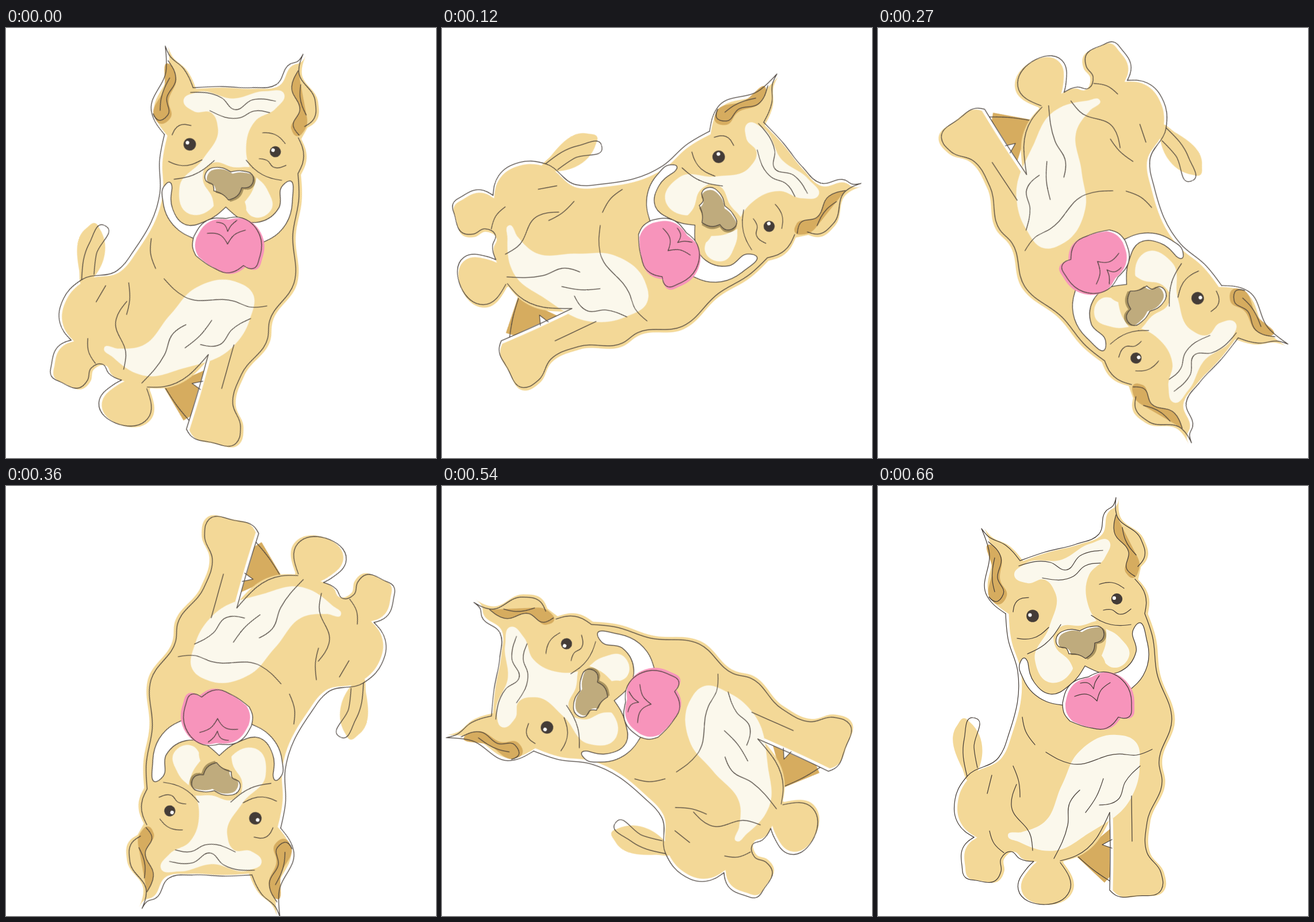
Write an HTML page that moves like this. It is 748 px wide and 748 px high and loops after 690 ms.

```html
<!DOCTYPE html>
<html lang="en">
<head>
<meta charset="utf-8">
<title>Spinning dog</title>
<style>
html, body { margin: 0; width: 100%; height: 100%; overflow: hidden; background: #fff; }
svg { display: block; width: 100vw; height: 100vh; }
#dog { transform-origin: 376.7px 390.2px; }
</style>
</head>
<body>
<svg viewBox="0 0 748 748"><g id="dog"></g></svg>
<script>
const INK = '#463e38', TAN = '#f3d897', CREAM = '#fbf8ec', BROWN = '#d6ac5f', PINK = '#f794bb';
const dog = document.getElementById('dog');

function add(tag, attrs, parent = dog) {
  const el = document.createElementNS('http://www.w3.org/2000/svg', tag);
  for (const key in attrs) el.setAttribute(key, attrs[key]);
  return parent.appendChild(el);
}

const sub = (a, b) => [a[0] - b[0], a[1] - b[1]];
const move = (a, v, k) => [a[0] + v[0] * k, a[1] + v[1] * k];
const unit = v => move([0, 0], v, 1 / (Math.hypot(...v) || 1));

// Direction of the circle through three neighbours, taken at the middle one.
function tangent(a, b, c) {
  const u = sub(b, a), v = sub(c, b);
  return unit(move(move([0, 0], unit(u), Math.hypot(...v)), unit(v), Math.hypot(...u)));
}

// Smooth curve through key points "x,y"; "/" makes a corner.
function curve(text, start = 'M') {
  let d = '', last;
  for (const run of text.split('/')) {
    const p = run.trim().split(/\s+/).map(s => s.split(',').map(Number));
    if (last) p.unshift(last);
    else d = start + p[0];
    const n = p.length - 1, loop = n > 2 && '' + p[0] === '' + p[n];
    for (let i = 0; i < n; i++) {
      const a = p[i], b = p[i + 1], reach = 0.37 * Math.hypot(...sub(b, a));
      const before = p[i - 1] || (loop && p[n - 1]), after = p[i + 2] || (loop && p[1]);
      let c1 = before && move(a, tangent(before, a, b), reach);
      const c2 = after ? move(b, tangent(a, b, after), -reach) : move(b, unit(sub(b, c1 || a)), -reach);
      c1 = c1 || move(a, unit(sub(c2, a)), reach);
      d += `C${[c1, c2, b].map(q => q.map(v => v.toFixed(1))).join(' ')}`;
    }
    last = p[n];
  }
  return d;
}

const fill = (d, color, dx = 0, dy = 0, parent = dog) =>
  add('path', { d, fill: color, transform: `translate(${dx} ${dy})` }, parent);
const line = d => add('path', {
  d, fill: 'none', stroke: INK, 'stroke-width': 1.25, 'stroke-linecap': 'round', 'stroke-linejoin': 'round'
});

const outline = [
  // head
  `452,140 463,125 457,92 415,50 414,20 / 409,34 397,43 384,84 345,101 290,115 247,130
   / 222,103 191,87 180,74 / 193,112 190,192 222,222`,
  // back
  '222,222 226,265 243,322 228,430 210,472 155,505 134,545 140,588 167,611',
  // hind feet
  `167,611 149,627 146,660 152,681 170,686 207,684 214,670 214,648 232,636 246,648 271,653
   / 260,664 244,702 290,728 333,705 317,655`,
  // belly
  '317,652 345,643 403,568',
  // front leg and neck
  `403,568 404,640 403,703 / 412,711 450,713 493,702 492,672 468,638 468,585 494,510 489,485
   511,405 485,325 477,260 464,222 / 465,190 447,162`
];

// Tail and far leg
fill(curve('150,404 138,416 146,490 162,514 174,495 160,411 150,404'), TAN);
fill('M346 645L403 597V680L394 690Z', BROWN);
fill('M408 614L390 624L408 630Z', '#fff');
line('M407 615L390 624L407 630');
line(curve('346,643 375,668 403,687'));

// Body and markings; colour sits a little to the right of the ink
fill(outline.map((s, i) => curve(s, i ? 'L' : 'M')).join(''), TAN, 5.5, 0.5);
fill(curve(`237,155 255,136 320,128 370,100 402,96 395,124 367,155 365,205 385,240 420,263 437,295
  410,316 389,300 380,270 330,270 338,320 300,342 273,303 298,245 308,185 290,163 260,169 237,155`), CREAM);
fill(curve('305,262 316,246 352,243 392,239 397,265 389,295 / 395,313 365,321 341,322 / 334,306 308,278 305,262'), TAN);
fill(curve(`415,433 445,442 455,490 440,543 365,605 310,634 245,619 226,608 250,602 285,588 320,520
  350,462 415,433`), CREAM);
fill(curve('195,102 213,120 213,165 224,191 208,206 197,198 199,145 195,102'), BROWN);
fill(curve('414,50 411,80 436,115 432,152 443,160 454,145 447,115 / 414,50'), BROWN);

outline.forEach(s => line(curve(s)));
line(curve('155,505 150,440 165,403 170,404 167,455 173,490'));

// Mouth
const mouth = curve(`261,308 254,299 247,308 253,336 293,375 320,381 / 380,390 440,353
  / 461,330 468,270 452,239 444,250 449,288 418,324 360,313 / 335,345 300,362 272,342 261,308`);
fill(mouth, '#fff');
line(mouth);

const tongue = curve(`321,378 335,345 366,332 / 385,324 430,343 441,380 436,402 418,402
  / 398,421 366,420 334,409 / 324,396 321,378`);
fill(tongue, '#fff');
fill(tongue, PINK, 5, 0.5);
line(tongue);

// Nose: light inside the ink, shaded where the colour spills over
const nose = curve(`361,300 350,294 332,292 / 327,282 314,279 311,262 326,251 351,252
  / 368,245 390,248 389,268 377,273 / 375,286 361,300`);
add('path', { d: nose }, add('clipPath', { id: 'nose' }));
fill(nose, '#a8925f', 4, 2);
const inside = add('g', { 'clip-path': 'url(#nose)' });
fill(nose, '#fff', 0, 0, inside);
fill(nose, '#bfab7d', 4, 2, inside);
line(nose);

// Eyes
for (const [x, y, r] of [[269, 226, 10.8], [415.5, 196.5, 9.7]]) {
  add('circle', { cx: x, cy: y, r, fill: '#443c37' });
  add('circle', { cx: x - 4.6, cy: y - 1.6, r: 3.1, fill: '#fff' });
}

// Folds of ears, face, tongue, chest and legs
[
  '192,97 214,125 208,160 218,188 205,201 193,193',
  '203,125 199,165 203,184',
  '414,50 411,80 436,115 433,145 447,157',
  '425,72 430,93 449,120',
  '245,139 300,133 327,146 352,121 391,112',
  '286,160 340,157 360,139 387,134',
  '235,219 242,200 262,194',
  '242,265 268,265 297,246',
  '260,292 288,277 318,241',
  '385,171 407,168 428,178',
  '392,216 406,215 420,223 440,214',
  '371,225 405,241 440,241',
  '352,343 366,343 375,353 / 378,341 385,330',
  '342,366 366,363 381,374 / 388,355 404,342',
  '251,402 257,427 273,450',
  '292,463 335,483 420,466 450,468 477,458',
  '306,648 330,590 334,550 351,529',
  '361,568 380,540 392,509',
  '385,555 418,545 430,515 456,487',
  '441,539 442,618',
  '235,487 245,515 247,541',
  '241,519 232,555 266,610 269,634',
  '198,503 190,535',
  '194,600 202,622 219,638'
].forEach(s => line(curve(s)));

// A full turn takes 22 steps; the upright pose holds for one more.
const STEPS = 22, STEP_MS = 30;
dog.animate(
  { transform: ['rotate(0deg)', `rotate(${360 * (STEPS + 1) / STEPS}deg)`] },
  { duration: STEP_MS * (STEPS + 1), delay: -1, iterations: Infinity, easing: `steps(${STEPS + 1}, end)` }
);
</script>
</body>
</html>
```
